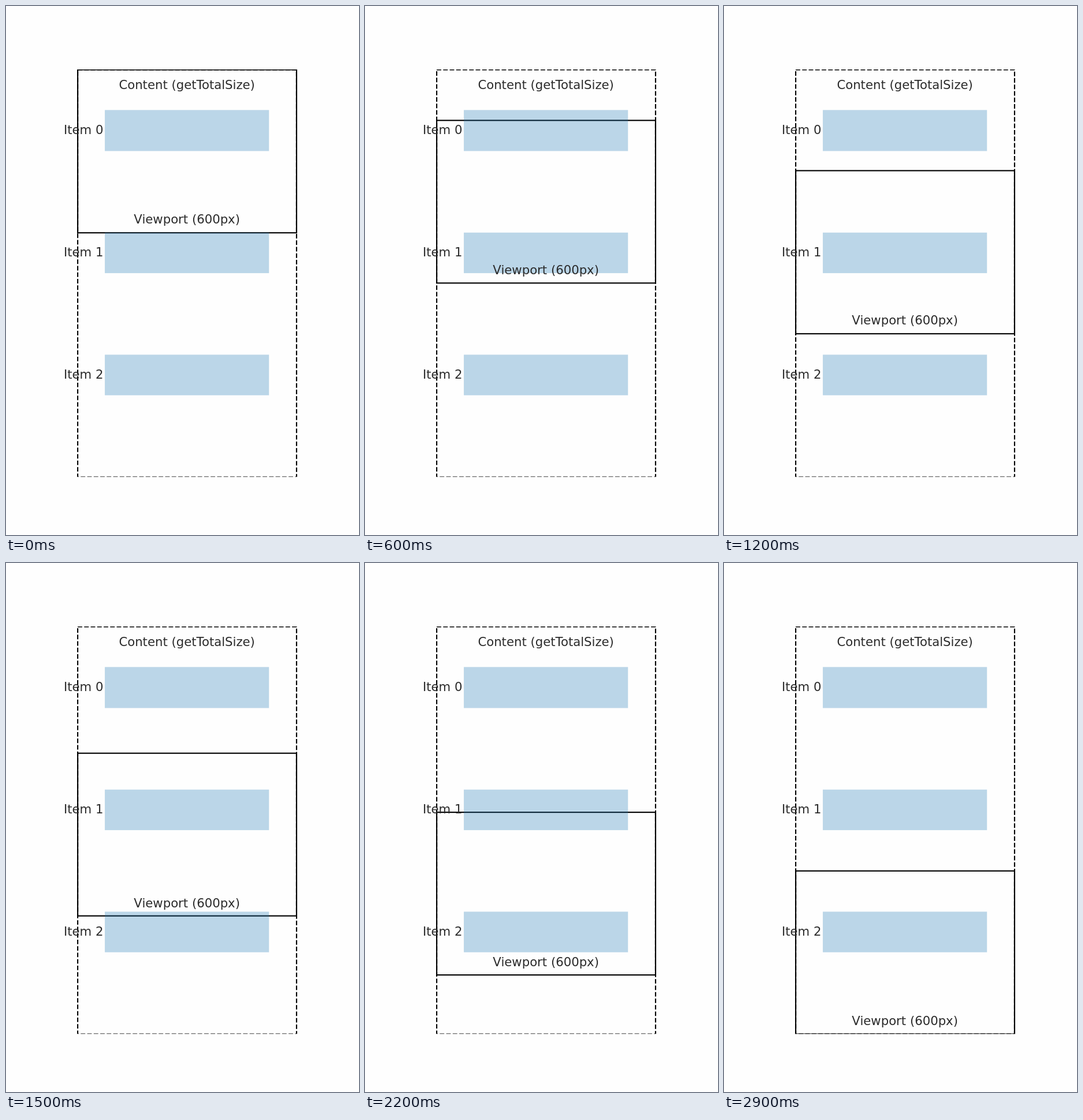
Write an HTML page with a canvas that moves like this. It is 611 px wide and 917 px high and loops after 3 s.

```html
<!DOCTYPE html>
<html lang="en">
<head>
<meta charset="utf-8">
<title>Scrolling viewport</title>
<style>
  html, body { margin: 0; width: 100%; height: 100%; overflow: hidden; background: #fefefe; }
  canvas { display: block; }
</style>
</head>
<body>
<canvas id="stage" width="611" height="917"></canvas>
<script>
const ctx = document.getElementById("stage").getContext("2d");

// The chart is laid out on an 800 x 1200 sheet, scaled to the stage.
const SHEET = { w: 800, h: 1200 };
const PLOT = { left: 162, right: 658, top: 144, bottom: 1068 };
const TOTAL = 1500, VIEW = 600, STEPS = 30, STEP_MS = 100;
const FONT_SIZE = 27.78;

const toY = size => PLOT.top + (PLOT.bottom - PLOT.top) * size / TOTAL;
const snapLine = v => Math.floor(v + 0.5) + 0.5;

function outline(from, to, dash) {
  const x = snapLine(PLOT.left), y = snapLine(toY(from));
  ctx.setLineDash(dash);
  ctx.strokeRect(x, y, snapLine(PLOT.right) - x, snapLine(toY(to)) - y);
}

function label(text, x, size, align) {
  ctx.textAlign = align;
  ctx.fillText(text, x, Math.round(toY(size) + FONT_SIZE * 0.29));
}

function draw(step) {
  const offset = (TOTAL - VIEW) * step / (STEPS - 1);
  ctx.setTransform(1, 0, 0, 1, 0, 0);
  ctx.fillStyle = "#fefefe";
  ctx.fillRect(0, 0, 611, 917);
  ctx.scale(611 / SHEET.w, 917 / SHEET.h);

  ctx.save();
  ctx.beginPath();
  ctx.rect(0, PLOT.top, SHEET.w, PLOT.bottom - PLOT.top);
  ctx.clip();
  ctx.strokeStyle = "#000";
  ctx.lineWidth = 2.78;
  outline(0, TOTAL, [10.28, 4.44]);
  outline(offset, offset + VIEW, []);
  ctx.restore();

  for (let i = 0; i < 3; i++) {
    const start = 150 + i * 450;
    const y = Math.round(toY(start));
    ctx.fillStyle = "rgba(31, 119, 180, 0.3)";
    ctx.fillRect(224, y, 372, Math.round(toY(start + 150)) - y);
    ctx.fillStyle = "#2b2b2b";
    label("Item " + i, 220.5, start + 75, "right");
  }
  ctx.fillStyle = "#2b2b2b";
  label("Content (getTotalSize)", 410, 60, "center");
  label("Viewport (600px)", 410, offset + 555, "center");
}

ctx.font = FONT_SIZE + 'px "DejaVu Sans", sans-serif';

function tick() {
  draw(Math.floor(performance.now() / STEP_MS) % STEPS);
  requestAnimationFrame(tick);
}
tick();
</script>
</body>
</html>
```
